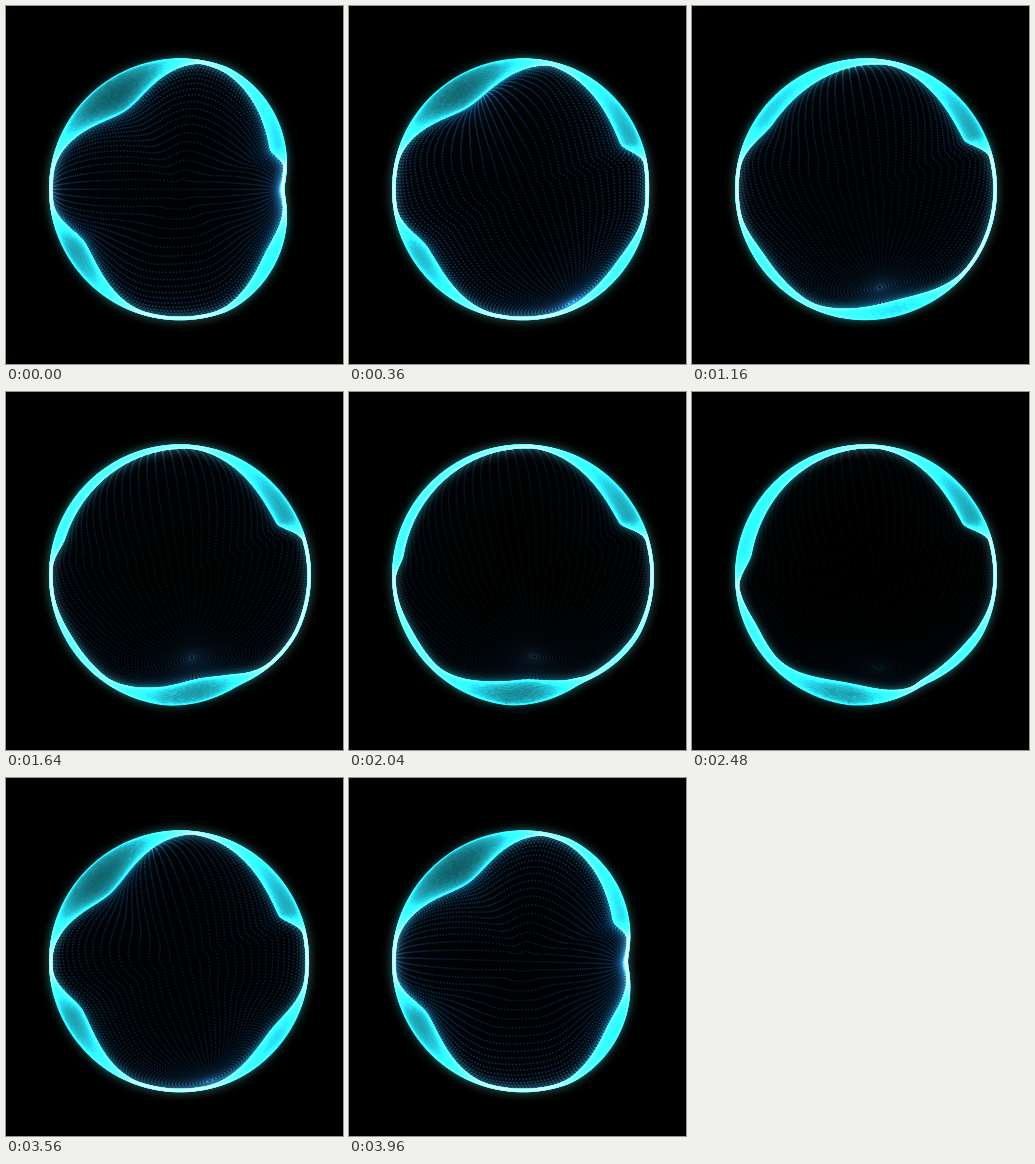
Recreate the animation shown at these times as an HTML page with a canvas. Size 337 by 358 pixels, loop 4 s.

```html
<!DOCTYPE html>
<html lang="en">
<head>
<meta charset="utf-8">
<title>Energy sphere</title>
<style>
  html, body { margin: 0; width: 100%; height: 100%; overflow: hidden; background: #000; }
  canvas { display: block; }
</style>
</head>
<body>
<canvas id="stage" width="337" height="358"></canvas>
<script>
const W = 337, H = 358, CX = 174, CY = 183.3, R = 130.5;
const LOOP = 4000, STEP = 40, N = 360, LAYERS = 40, TAU = Math.PI * 2;
const ROWS = 116, COLS = 80;
const ctx = document.getElementById('stage').getContext('2d');
const sheet = document.createElement('canvas');
sheet.width = W;
sheet.height = H;
const ink = sheet.getContext('2d');

const turn = d => ((d + 540) % 360 + 360) % 360 - 180;
const clamp = v => Math.max(0, Math.min(1, v));

// One swing per loop, highest at the given phase in degrees.
const wave = (p, peak = 0) => Math.cos(p * TAU - peak * TAU / 360);

// Short squeeze around the loop seam.
const squeeze = p => Math.max(0, wave(p)) ** 10;

// Folds of the inner rim, angles in degrees clockwise from the right.
const foldsAt = p => [
  { at: 333 + 2 * wave(p), depth: 18 - 5 * squeeze(p), before: 60, after: 13 },
  { at: 213 + 24 * wave(p, 20), depth: 19 + 13 * wave(p, -10), before: 30 + 18 * wave(p), after: 72 - 25 * wave(p) },
  { at: 150 + 4 * wave(p, 270), depth: 11 + 8 * wave(p, -20), before: 45, after: 24 },
  { at: 90 + 15 * wave(p, 270), depth: 9 - 13 * wave(p), before: 38, after: 50 },
  { at: 38, depth: 6 + 7 * wave(p, -50), before: 30, after: 40 }
];

// Dents of the outer rim.
const dentsAt = p => [
  { at: 0, depth: 28 * squeeze(p), half: 70 },
  { at: 62, depth: -9 * wave(p, 10), half: 36 }
];

function fold(angle, { at, depth, before, after }) {
  const d = turn(angle - at);
  const s = clamp(1 - Math.abs(d) / (d < 0 ? before : after));
  return Math.max(0, depth) * s * s * (3 - 2 * s);
}

function notch(angle, { at, depth, half }) {
  const d = Math.hypot(turn(angle - at), 3);
  return Math.max(0, depth) * clamp(1 - d / half) ** 1.3;
}

function rims(p) {
  const folds = foldsAt(p), dents = dentsAt(p);
  const outer = [], inner = [];
  for (let a = 0; a < N; a++) {
    outer[a] = R - dents.reduce((sum, d) => sum + notch(a, d), 0);
    inner[a] = outer[a] - 2.6 - Math.hypot(...folds.map(f => fold(a, f)));
  }
  return { outer, inner };
}

function drawBand({ outer, inner }) {
  ink.lineWidth = 1.1;
  ink.strokeStyle = 'rgb(14,82,90)';
  for (let l = 0; l < LAYERS; l++) {
    const s = ((1 - Math.cos(Math.PI * l / (LAYERS - 1))) / 2) ** .85;
    ink.beginPath();
    for (let a = 0; a < N; a++) {
      const r = outer[a] + (inner[a] - outer[a]) * s, th = a * TAU / N;
      ink.lineTo(CX + r * Math.cos(th), CY + r * Math.sin(th));
    }
    ink.closePath();
    ink.stroke();
  }
}

// Front half of a dotted globe, fitted inside the inner rim.
function drawMesh(inner, p) {
  const light = p < .76 ? clamp((.76 - p) * 1.6) : clamp((p - .76) * 6);
  const heading = (1 - squeeze(p)) * 82 * TAU / 360;
  const flat = .88 + .11 * wave(p), pz = Math.sqrt(1 - flat * flat);
  const dx = Math.cos(heading), dy = Math.sin(heading);
  ink.fillStyle = 'rgb(13,68,118)';
  for (let i = 1; i < ROWS; i++) {
    const lat = i * Math.PI / ROWS, c = Math.cos(lat), s = Math.sin(lat);
    for (let j = 0; j < COLS; j++) {
      const lon = j * TAU / COLS, a = Math.cos(lon) * s, b = Math.sin(lon) * s;
      if (pz * c + flat * b < 0) continue;
      const along = flat * c - pz * b;
      const x = dx * along - dy * a, y = dy * along + dx * a;
      const deg = Math.floor((Math.atan2(y, x) / TAU + 1) * N) % N;
      ink.globalAlpha = light * (.45 + .45 * (x * x + y * y)) * Math.sqrt(s);
      ink.fillRect(CX + x * inner[deg] - .75, CY + y * inner[deg] - .75, 1.5, 1.5);
    }
  }
  ink.globalAlpha = 1;
}

function clear(c) {
  c.globalCompositeOperation = 'source-over';
  c.fillStyle = '#000';
  c.fillRect(0, 0, W, H);
  c.globalCompositeOperation = 'lighter';
}

function draw(p) {
  const shape = rims(p);
  clear(ink);
  drawMesh(shape.inner, p);
  drawBand(shape);

  clear(ctx);
  ctx.globalAlpha = .5;
  ctx.filter = 'blur(5px)';
  ctx.drawImage(sheet, 0, 0);
  ctx.globalAlpha = .9;
  ctx.filter = 'blur(0.5px)';
  ctx.drawImage(sheet, 0, 0);
  ctx.filter = 'none';
  ctx.globalAlpha = 1;
}

const start = performance.now();
function tick() {
  const t = (performance.now() - start) % LOOP;
  draw(Math.floor(t / STEP) * STEP / LOOP);
  requestAnimationFrame(tick);
}
tick();
</script>
</body>
</html>
```
